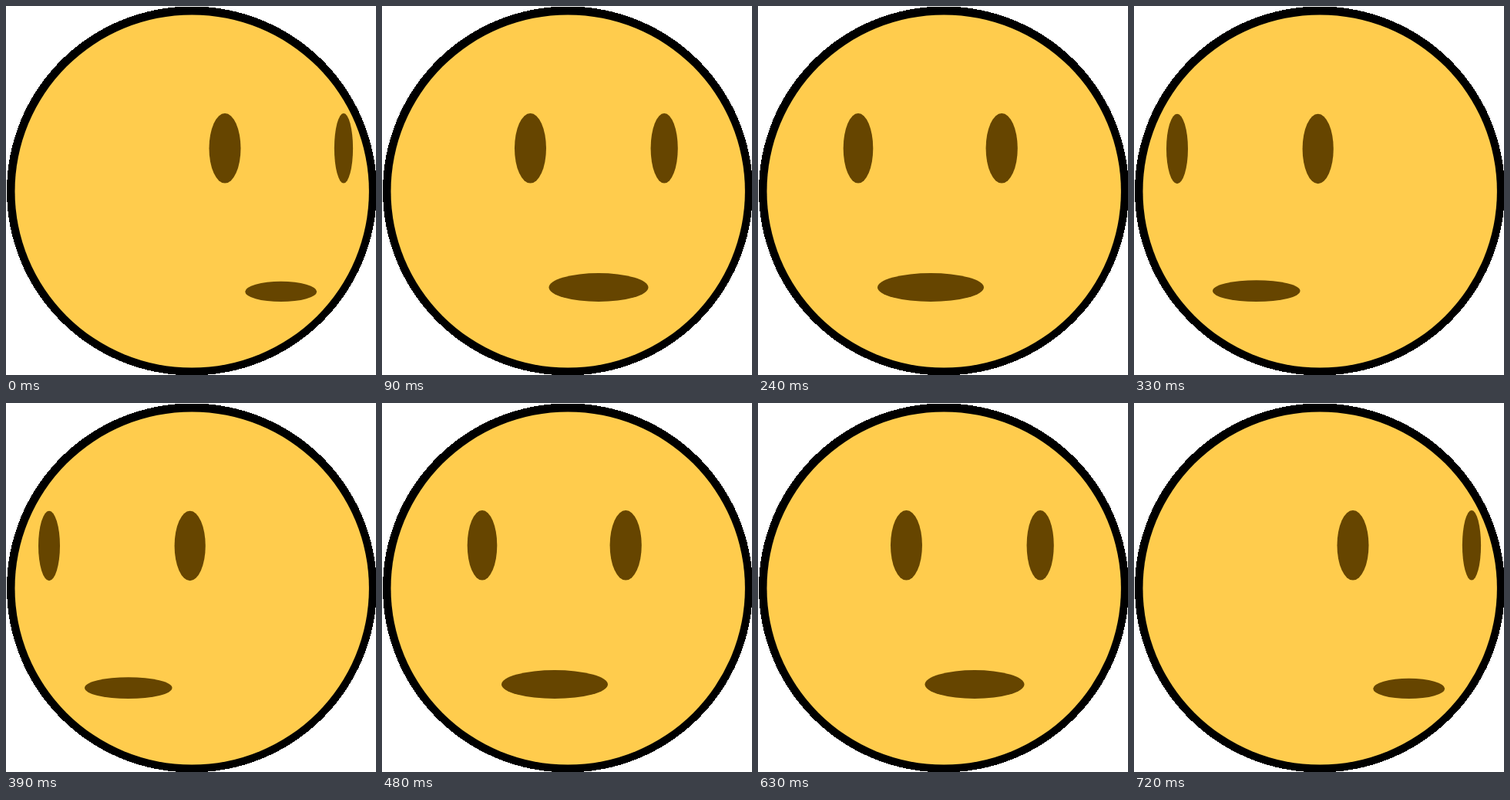
An HTML page for the animation above (0.75 s loop, 480 by 478 pixels).

```html
<!DOCTYPE html>
<html lang="en">
<head>
<meta charset="utf-8">
<title>Shaking head</title>
<style>
  html, body { margin: 0; width: 100%; height: 100%; overflow: hidden; background: #fff; }
  svg { display: block; width: 100%; height: 100%; }
</style>
</head>
<body>
<svg viewBox="0 0 480 478">
  <ellipse cx="241" cy="239.5" rx="240" ry="239" shape-rendering="crispEdges"/>
  <ellipse cx="241.2" cy="240" rx="229.7" ry="228.6" fill="#ffcc4d"/>
  <g fill="#664500">
    <ellipse id="left" ry="45.3"/>
    <ellipse id="right" ry="45.3"/>
    <ellipse id="mouth"/>
  </g>
</svg>
<script>
const STEP = 30, STEPS = 25, HALF = 12;

// Head turn: 1 = far right, 0 = facing front, -1 = far left.
const turns = [1, 0.293, -0.134, -0.741, -1];

// Centre and half width of each feature at those turns.
const face = {
  left:  { cx: [284, 192.5, 130, 56, 37], rx: [20.5, 20.5, 19.3, 14, 10] },
  right: { cx: [438, 366.2, 316.2, 238.7, 207], rx: [12.1, 17.6, 20.6, 20.1, 19] },
  mouth: { cx: [356.7, 281, 224, 158.8, 134], rx: [46.5, 64.5, 69, 56.8, 50] }
};

// Smooth curve through the values at the given turns.
function curve(values, s) {
  return values.reduce((sum, v, i) =>
    sum + turns.reduce((p, t, j) =>
      j === i ? p : p * (s - t) / (turns[i] - t), v), 0);
}

// Fast at the sides, resting in the middle.
function turnAt(k) {
  const u = (k - HALF / 2) / (HALF / 2);
  return -Math.sign(u) * (1 - Math.cos(u * Math.PI / 2));
}

function easeInOut(p) {
  return p < 0.5 ? 4 * p ** 3 : 1 - (2 - 2 * p) ** 3 / 2;
}

function set(id, attrs) {
  const el = document.getElementById(id);
  for (const name in attrs) el.setAttribute(name, attrs[name].toFixed(2));
}

function draw(ms) {
  const step = Math.floor((ms + 0.01) / STEP) % STEPS;
  const k = HALF - Math.abs(step - HALF);
  const s = turnAt(k);
  for (const id in face) {
    set(id, { cx: curve(face[id].cx, s), rx: curve(face[id].rx, s) });
  }

  const eyeY = 184.3 + (s < -0.5 ? 0.7 : 0);
  set("left", { cy: eyeY });
  set("right", { cy: eyeY });

  const open = easeInOut(Math.min(1, k / 3, (HALF - k) / 3));
  const ry = 13.1 + 5.4 * open;
  set("mouth", { cy: 383 - ry, ry });
}

const start = performance.now();
function tick() {
  draw(performance.now() - start);
  requestAnimationFrame(tick);
}
tick();
</script>
</body>
</html>
```
